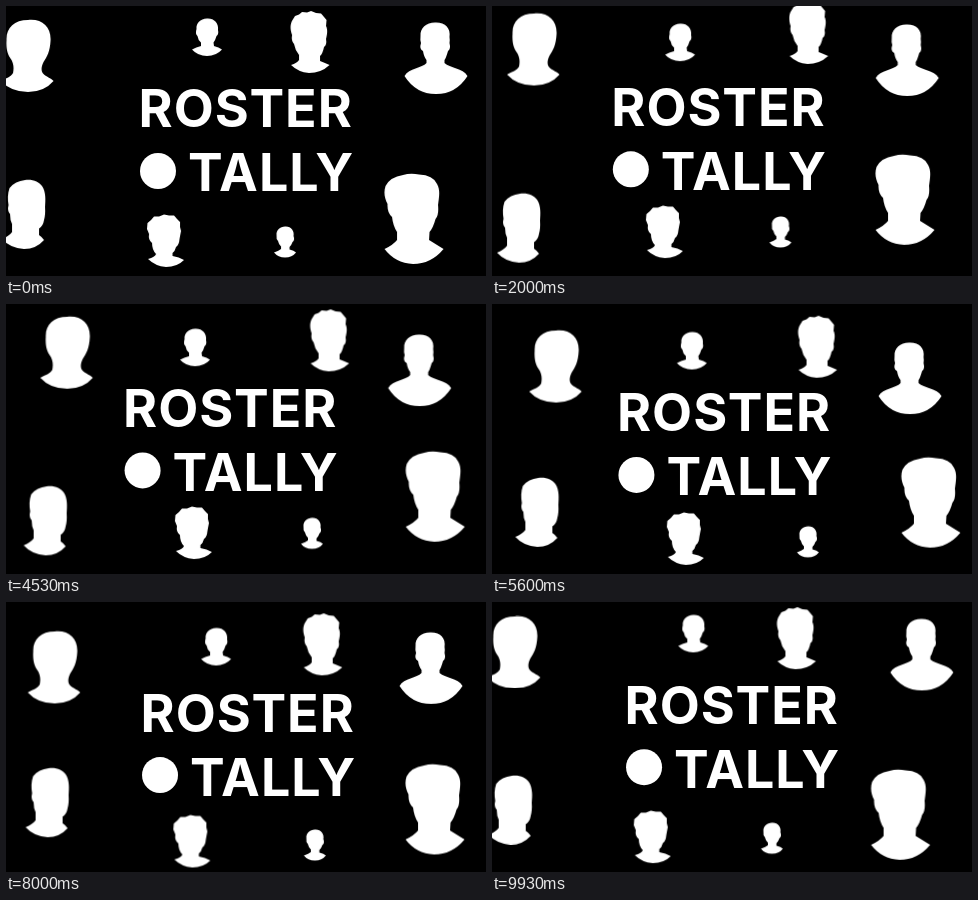
Animation, 480 px wide and 270 px high, one loop 9.99 s. Source, as an HTML page without scripts:

```html
<!DOCTYPE html>
<html lang="en">
<head>
<meta charset="utf-8">
<title>Roster Tally</title>
<style>
  html, body { margin: 0; width: 100%; height: 100%; overflow: hidden; background: #000; }
  svg { display: block; width: 100%; height: 100%; fill: #fff; }
  text { font: 700 52px Inter, "Open Sans", sans-serif; letter-spacing: 1px; }

  /* Every part drifts along its own triangle: home, first turn, second turn, home. */
  .drift { animation: 9.99s linear infinite; }
  .title { animation-name: title; }
  .a { animation-name: a; }
  .b { animation-name: b; }
  .c { animation-name: c; }
  .d { animation-name: d; }
  .e { animation-name: e; }
  .f { animation-name: f; }
  .g { animation-name: g; }
  .h { animation-name: h; }

  @keyframes title { 35%   { transform: translate(-23px, -3px); }     70.5% { transform: translate(3px, 12px); } }
  @keyframes a     { 37%   { transform: translate(37px, -12px); }     66.5% { transform: translate(45px, 26px); } }
  @keyframes b     { 35%   { transform: translate(-22.5px, 9px); }    70.5% { transform: translate(13.5px, 20px); } }
  @keyframes c     { 25.5% { transform: translate(16px, -11.5px); }   64%   { transform: translate(23px, 11.5px); } }
  @keyframes d     { 30.5% { transform: translate(-22.5px, 3px); }    62%   { transform: translate(-9.5px, 26.5px); } }
  @keyframes e     { 30%   { transform: translate(13.5px, 20.5px); }  70.5% { transform: translate(35px, -11.5px); } }
  @keyframes f     { 31%   { transform: translate(20px, -13.8px); }   69%   { transform: translate(41px, 7px); } }
  @keyframes g     { 33%   { transform: translate(15.5px, -16.5px); } 68%   { transform: translate(48px, 11.3px); } }
  @keyframes h     { 30%   { transform: translate(7.5px, -28.7px); }  64%   { transform: translate(38px, -10px); } }
</style>
</head>
<body>
<svg viewBox="0 0 480 270">
  <!-- top row -->
  <path class="drift a" d="M22 14C36 12.500 45.500 21 44.500 35C44 45 41 51 37.500 56C35 61 35 65 37 67.500C40 71 45 72 47.500 75Q38 86 22 86Q5 86 -5 75C0 72 5 71 7 67C8 62 7.500 58 5.500 54C1 48 0 42 .5 34C0 22 8 14 22 14Z"/>
  <path class="drift b" d="M201 12.500C208 12 213 17 212 24Q213 28 210.500 30Q209 35 207.500 36.500L208 40Q213 41 216 43.500Q210 50 201 50Q192 50 186 43.500Q190 41 195 40V36.500Q192 34 191.500 30Q189 28 190.500 23C190 17 194 13 201 12.500Z"/>
  <path class="drift c" d="M286.500 14L289 10L293 8.500L296 6L301 6.500L305 5L310 7L315 7.500L318 11L320.500 14L320 20C322 24 321 29 320 33Q321 39 318 41Q316.500 48 314 50V55Q319 57 323.500 59Q315 67 303 67Q292 66 285 59Q291 57 293 54V49Q289 44 288 38Q285 35 286 29C284 23 284 18 286.500 14Z"/>
  <path class="drift d" d="M429 16.500C439 16 445 22 443.500 31Q444 34 443.500 37Q445 43 442 45Q440 52 438.500 54V57C444 62 457 62 461.500 70Q450 88 430 88Q410 88 398.500 70C403 62 416 62 420.500 57V54Q418 51 417 45Q413 43 415 37Q414 34 414.500 30C414 22 420 16.500 429 16.500Z"/>

  <!-- bottom row -->
  <path class="drift e" d="M19 174C27 173 33 176 36 180C40 186 39.500 194 39 201Q39.500 209 38 214Q37 220 33 222.500L33 229Q36 231 38 234Q30 243 18 243Q4 242 -4 233Q3 230 6 226V218Q4 214 4 208Q1 205 2.500 199C1.500 193 1.500 188 3.500 182Q9 175 19 174Z"/>
  <path class="drift f" d="M141.500 217L145 214L148 210.500L153 210.500L158 208.500L163 209.500L168 209.500L171 213L174 216L174 221L175 225Q174 230 173.500 233Q173 239 170 241Q169 245 166.500 247V250Q173 251 178 254Q171 261 160 261Q149 260 142 253Q149 251 150 248Q146 244 146 237Q142 234 143 228L141 223Z"/>
  <path class="drift g" d="M279 220.500C285 220 288.500 225 287.500 230Q289 234 286.500 236Q285 240 283.500 241V243.500Q288 244.500 290 246.500Q286 251.500 279 251.500Q272 251.500 268 246.500Q273 244.500 275 243V240.500Q272.500 238 272 235Q270 233 270.500 229C270 224 274 221 279 220.500Z"/>
  <path class="drift h" d="M397 169Q404 167 413 168.500Q427 169 431 178C434.500 184 433 191 432 199Q433 209 429.500 213Q427 222 423.500 226L423 234Q431 239 437.500 243Q425 258 407 258Q389 257 378.500 243Q387 239 391 234V226Q387 220 386 211Q381 207 381.500 198C378.500 192 377.500 186 379.500 180Q384 171 397 169Z"/>

  <g class="drift title">
    <text x="132.500" y="121.500">ROSTER</text>
    <circle cx="152" cy="165" r="18"/>
    <text x="182" y="185.500">TALLY</text>
  </g>
</svg>
</body>
</html>
```
